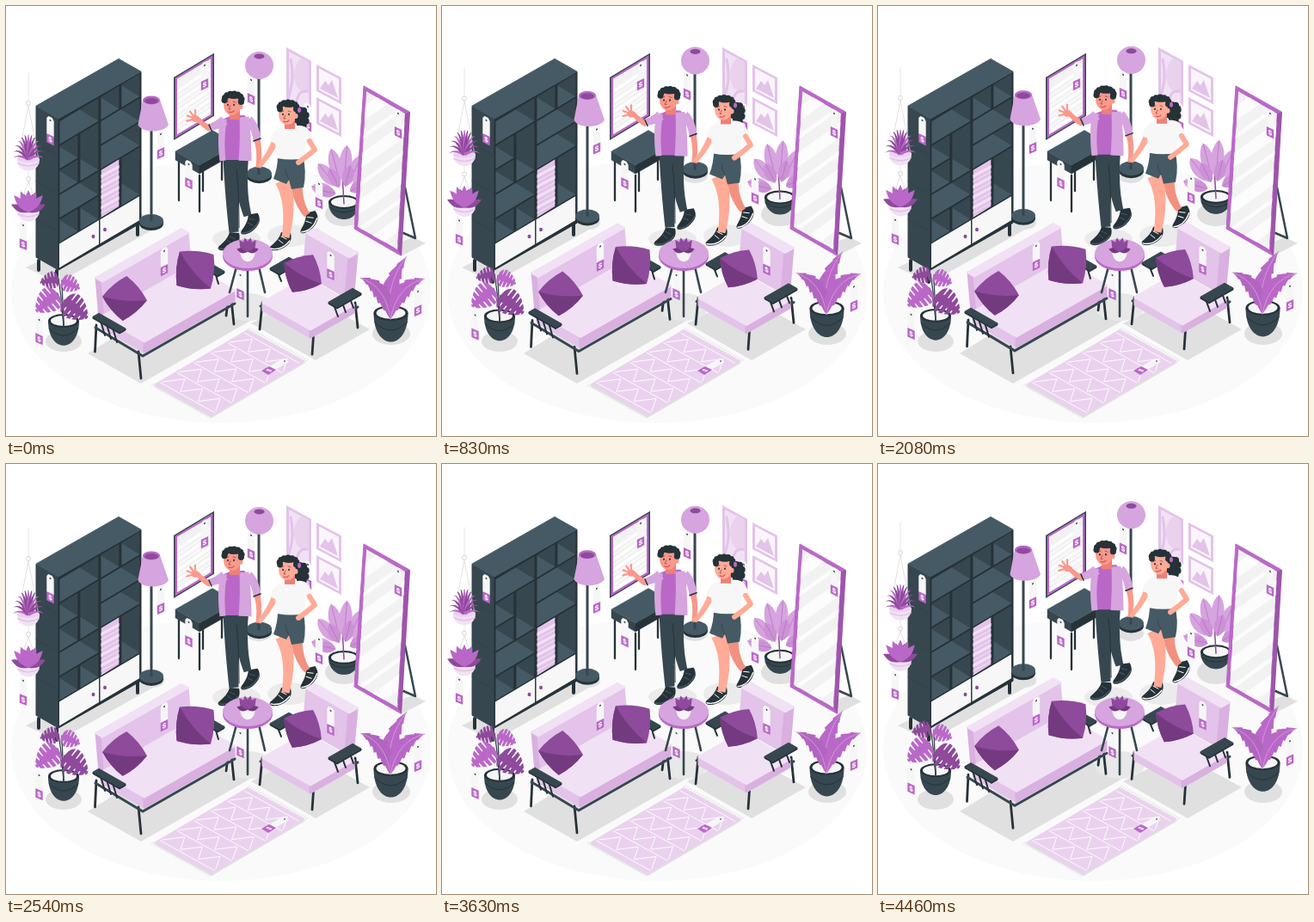
These frames come from a looping animation (500 by 500 pixels, 4.5 s). An HTML page:

```html
<!DOCTYPE html>
<html lang="en">
<head>
<meta charset="utf-8">
<title>Furniture showroom</title>
<style>
html, body { margin: 0; width: 100%; height: 100%; overflow: hidden; background: #fff; }
svg { display: block; width: 100%; height: 100%; }
text { font: 700 7.5px Inter, Arial, sans-serif; text-anchor: middle; fill: #fff; }
</style>
</head>
<body>
<svg id="stage" viewBox="0 0 500 500"></svg>
<script>
const INK = '#263238', DARK = '#37474f', SLATE = '#455a64';
const PURPLE = '#ba68c8', DEEP = '#8e4a9b', PLUM = '#743a80';
const MID = '#d6a4de', ROSE = '#d9b0e0', PINK = '#e3c3e9', PALE = '#ead2ee', LIGHT = '#f1e1f4';
const SHADE = '#e0e0e0', TAN = '#f9988b', PEACH = '#ffab97';
const ISO = .57;

const path = (d, fill, extra = '') => `<path d="${d}" fill="${fill}" ${extra}/>`;
const line = (d, color, w = 1) =>
  path(d, 'none', `stroke="${color}" stroke-width="${w}" stroke-linecap="round" stroke-linejoin="round"`);
const soft = (pts, fill, w = 1) =>
  `<polygon points="${pts}" fill="${fill}" stroke="${fill}" stroke-width="${w}" stroke-linejoin="round"/>`;
const poly = (pts, fill) => `<polygon points="${pts}" fill="${fill}"/>`;
const oval = (x, y, rx, ry, fill) => `<ellipse cx="${x}" cy="${y}" rx="${rx}" ry="${ry}" fill="${fill}"/>`;
const float = s => `<g class="float">${s}</g>`;
const repeat = (n, f) => Array.from({ length: n }, (_, i) => f(i, n > 1 ? i / (n - 1) : 0)).join('');
const polar = (x, y, r, deg, ry = r) =>
  [x + r * Math.cos(deg * Math.PI / 180), y + ry * Math.sin(deg * Math.PI / 180)];

let clips = 0;
function clipped(pts, body) {
  const id = 'c' + clips++;
  return `<clipPath id="${id}"><polygon points="${pts}"/></clipPath><g clip-path="url(#${id})">${body}</g>`;
}

// Solid with its nearest top corner at x, y; a runs back to the left, b to the right
function box(x, y, a, b, h, [top, left, right], lean = 0, round = 1) {
  const l = [x - a, y - a * ISO], r = [x + b, y - b * ISO], back = [x + b - a, y - (a + b) * ISO];
  const down = p => [p[0] + lean, p[1] + h];
  return soft([l, [x, y], down([x, y]), down(l)], left, round) +
    soft([r, [x, y], down([x, y]), down(r)], right, round) + soft([l, [x, y], r, back], top, round);
}

// Parallelogram with upright sides, inset by m
function panel(x, y, w, h, slope, m = 0) {
  const at = u => y + slope * u;
  return [[x + m, at(m) + m], [x + w - m, at(w - m) + m], [x + w - m, at(w - m) + h - m], [x + m, at(m) + h - m]];
}

// Band of varying half-width along a quadratic curve
function ribbon([x0, y0], [cx, cy], [x1, y1], width, fill, n = 20) {
  const left = [], right = [];
  for (let i = 0; i <= n; i++) {
    const t = i / n, s = 1 - t, w = width(t);
    const x = s * s * x0 + 2 * s * t * cx + t * t * x1, y = s * s * y0 + 2 * s * t * cy + t * t * y1;
    const dx = s * (cx - x0) + t * (x1 - cx), dy = s * (cy - y0) + t * (y1 - cy), k = w / Math.hypot(dx, dy);
    left.push([(x - dy * k).toFixed(1), (y + dx * k).toFixed(1)]);
    right.unshift([(x + dy * k).toFixed(1), (y - dx * k).toFixed(1)]);
  }
  return poly([...left, ...right], fill);
}
const limb = (p, c, q, w0, w1, fill) => ribbon(p, c, q, t => w0 + (w1 - w0) * t, fill);
const mid = (p, q) => [(p[0] + q[0]) / 2, (p[1] + q[1]) / 2 - .01];
const leaf = (p, q, w, fill) => ribbon(p, mid(p, q), q, t => w * Math.sin(Math.PI * t), fill);
const fan = (x, y, r, from, to, n, w, fill) =>
  repeat(n, (i, t) => leaf([x, y], polar(x, y, r, from + (to - from) * t), w, fill));

function tag(x, y, slope) {
  return `<g transform="matrix(1 ${slope} 0 1 ${x} ${y})">
    <path d="M-4.2-4V-23l2-3h4.4l2 3V-4z" fill="#f6f6f6"/>
    <circle cy="-22" r="1" fill="${DARK}"/>
    <rect x="-4.2" y="-5" width="8.4" height="10.4" fill="${PURPLE}"/>
    <text y="3">$</text></g>`;
}

const pot = (x, y, rx, h) =>
  path(`M${x - rx} ${y}C${x - rx} ${y + h * 1.28} ${x + rx} ${y + h * 1.28} ${x + rx} ${y}z`, DARK) +
  line(`M${x - rx + 1} ${y + h * .3}Q${x} ${y + h * .85} ${x + rx - 1} ${y + h * .3}`, INK) +
  oval(x, y, rx, rx * .44, INK) + oval(x, y, rx - 3, rx * .44 - 2, '#f5f5f5');

function glass(pts, base, stripe) {
  const [x, y] = pts[0], w = pts[1][0] - x, h = pts[2][1] - y;
  return clipped(pts, poly(pts, base) + repeat(9, i => {
    const c = y + (i + .3) * h / 7, half = w * .5;
    return line(`M${x - 9} ${c + half}L${x + w + 9} ${c - half}`, stripe, h * (i % 2 ? .025 : .075));
  }));
}

function shadows() {
  return oval(250, 332, 244, 153, '#fafafa') +
    poly('23,304 60,322 180,255 155,240', SHADE) +
    oval(170, 252, 14, 8, SHADE) + oval(294, 197, 15, 9, SHADE) +
    oval(268, 271, 28, 12, '#ebebeb') + oval(330, 267, 26, 13, '#ebebeb') +
    oval(393, 242, 22, 14, SHADE) + poly('459,291 488,276 474,269 440,280', SHADE) +
    poly('95,404 157,439 284,366 216,329', SHADE) +
    poly('285,369 360,412 423,376 350,336', SHADE) + oval(281, 350, 29, 16, '#e8e8e8') +
    oval(67, 390, 21, 12, SHADE) + oval(448, 381, 22, 13, SHADE);
}

function wall() {
  const mirror = m => panel(195, 83, 47, 73, -.6, m), art = m => panel(326, 48, 29, 76, .55, m);
  const print = y => poly(panel(361, y, 29, 31, .53), PINK) + poly(panel(361, y, 29, 31, .53, 3), '#faf5fb') +
    path(`M365 ${y + 28}l6-9l4 5l4-6l7 21z`, PINK);
  return poly(mirror(0), DARK) + poly(mirror(1.6), PURPLE) + glass(mirror(4), '#f2f2f2', '#fff') +
    poly(art(0), PINK) + clipped(art(3), poly(art(3), LIGHT) + oval(349, 80, 14, 21, PALE) +
      line('M327 120C342 122 334 97 350 99M331 62C337 90 328 103 328 109', PINK, 3)) +
    print(68) + print(106) + tag(231, 91, -.5) + tag(351, 139, .5);
}

// Cabinet front: u runs along its width, v down from its top edge
function cabinet() {
  const X = u => 61 + 96 * u, Y = (u, v) => 131 - 57 * u + v;
  const quad = (a, b, c, d) => [[X(a), Y(a, c)], [X(b), Y(b, c)], [X(b), Y(b, d)], [X(a), Y(a, d)]];
  const cell = (a, b, row, rows = 1) => {
    const pts = quad(a + .015, b - .015, row * 28.5 + 4, (row + rows) * 28.5 + 2);
    const [p, q, r, s] = pts, back = ([x, y]) => [x - 26, y - 16];
    return clipped(pts, poly(pts, '#2e3c43') + poly([q, r, back(r), back(q)], DARK) + poly([s, r, back(r), back(s)], SLATE));
  };
  const door = quad(.515, .735, 89, 144);
  return line('M38 296v11M59 308v13M153 252v14', INK, 4) +
    box(61, 131, 26, 96, 176, [SLATE, DARK, INK]) +
    repeat(3, i => line(`M35 ${160 + 44 * i}l26 15`, '#304049', .8)) +
    cell(0, .5, 0) + cell(0, .25, 1) + cell(0, .25, 2) + cell(.25, .5, 1, 2) + cell(0, .5, 3) +
    cell(0, .25, 4) + cell(.25, .5, 4) + cell(.5, .75, 0) + cell(.75, 1, 0) +
    cell(.5, 1, 1) + cell(.5, 1, 2) + cell(.75, 1, 3, 2) + glass(door, PINK, LIGHT) +
    poly(quad(.01, .49, 146, 174), '#f7f7f7') + poly(quad(.505, .98, 146, 174), '#f7f7f7') +
    oval(101.5, 268, 2, 2.3, DEEP) + oval(115, 260, 2, 2.3, DEEP) + tag(51.5, 155, .5);
}

function hanging() {
  const bowl = (y, hook) => line(`M26 ${hook + 3}L14 ${y}M26 ${hook + 3}L38 ${y}`, '#dadada', .8) +
    `<circle cx="26" cy="${hook}" r="2.5" fill="none" stroke="#d5d5d5"/>` +
    path(`M13 ${y}C13 ${y + 18} 39 ${y + 18} 39 ${y}z`, LIGHT) +
    line(`M14 ${y + 5}Q26 ${y + 11} 38 ${y + 5}`, PINK, 1.5) + oval(26, y, 13, 4, PALE);
  const spider = repeat(13, (i, t) => {
    const a = 180 + 180 * t;
    return ribbon([26, 178], polar(26, 172, 12, a, 26), polar(26, 177, 18, a, 27), s => 2 * (1 - s), i % 3 ? DEEP : PURPLE);
  });
  return line('M26 78V110M26 190V198', '#e0e0e0', .8) + bowl(178, 113) + spider + bowl(237, 201) +
    fan(26, 240, 22, -155, -25, 6, 4, DEEP) + fan(26, 240, 26, -130, -50, 5, 4, PURPLE) + tag(20, 277, .4);
}

const lampBase = (x, y, r) => oval(x, y + 3, r, r * .57, INK) + oval(x, y, r, r * .57, SLATE);

function shadeLamp() {
  return lampBase(169, 250, 14) + line('M169 143V249', DARK, 3) +
    path('M159 109L153.5 138C157 148 184 148 189 138L179 109z', MID) +
    oval(169, 109.5, 10, 5, PURPLE) + oval(169, 110.5, 8, 3.5, DEEP) + tag(180, 171, -.45);
}

function ballLamp() {
  return lampBase(294.5, 195, 14.5) + line('M294 83V195', DARK, 3) + oval(294.5, 69, 16.5, 16, MID) +
    oval(294.5, 58.5, 6, 3, DEEP) + tag(285, 108, .45);
}

function desk() {
  return line('M201 180V226M225 197V239M251 180V202M229 180V215', INK, 2.3) +
    box(225, 185, 28, 43, 10, [SLATE, DARK, INK], 0, .5) + tag(212.5, 206, .5);
}

function shoe(x, y, turn, lace) {
  return `<g transform="translate(${x} ${y}) rotate(${turn})">` +
    path('M0 0c5-4 10-9 12-16l11 1c2 8-1 12-5 15c-5 4-11 6-17 5c-3-1-3-3-1-5z', INK) +
    line('M0 3q12 3 22-9', lace, 1.4) + line('M9-7l5 4M12-11l6 3', lace, 1) + '</g>';
}

function face(x, y, skin) {
  return limb([x + 3, y + 4], [x + 3, y + 10], [x + 3, y + 17], 6, 6, '#ee8076') +
    oval(x, y, 10, 12, skin) + oval(x + 10, y + 2, 2.5, 3, skin) + oval(x - 5, y, .9, 1.2, INK) + oval(x + 2, y, .9, 1.2, INK) +
    line(`M${x - 7} ${y - 3}l3-1M${x + 1} ${y - 4}l3 1M${x - 2} ${y + 1}l-2 4h2`, '#8b3c43', .7) +
    line(`M${x - 4} ${y + 8}q3 2 6-1`, '#d64e55', 1.1);
}
const curls = (x, y, rx, ry, from, to, n, r) => repeat(n, (i, t) => {
  const [cx, cy] = polar(x, y, rx, from + (to - from) * t, ry);
  return oval(cx, cy, r, r, INK);
});

function man() {
  const legs = shoe(274, 261, -14, SLATE) + shoe(248, 279, 0, SLATE) +
    limb([273, 176], [272, 215], [281, 244], 9, 4.5, DARK) + limb([262, 176], [262, 220], [265, 263], 9.5, 5.5, DARK) +
    line('M268 190Q271 215 271 258', INK);
  const hand = limb([238, 143], [228, 138], [222, 130], 3.5, 2.5, TAN) + oval(220, 131, 4.5, 4, TAN) +
    repeat(4, (i, t) => line(`M220 131L${polar(220, 131, 10, -195 + 105 * t)}`, TAN, 2.2));
  const body = path('M251 132L263 127H277L284 134L279 179H254z', PURPLE) +
    limb([253, 131], [249, 155], [252, 180], 4, 3.5, MID) + limb([277, 129], [279, 155], [278, 180], 5.5, 7.5, MID);
  const arms = limb([254, 133], [248, 138], [237, 141], 6, 4, MID) + line('M236 138L239 145', INK, 1.5) +
    limb([291, 154], [296, 166], [293, 188], 3.6, 2.6, TAN) +
    limb([282, 132], [290, 140], [292, 156], 5, 4.5, MID) + line('M288 157L296 154', INK, 1.5);
  return hand + legs + body + arms + face(263, 115, TAN) +
    curls(264, 109, 10, 7, -185, 20, 9, 3.6) + oval(265, 104, 9, 4, INK);
}

function woman() {
  const legs = shoe(343, 260, -20, '#fff') + limb([338, 205], [338, 226], [350, 243], 7, 3.8, '#f2917f') +
    shoe(308, 279, 0, '#fff') + limb([321, 203], [333, 228], [325, 269], 8.5, 4.5, PEACH);
  const arm = limb([314, 153], [310, 168], [294, 187], 4, 2.6, PEACH);
  const shorts = path('M316 174H345Q350 192 346 211L332 213L329 202L326 207L311 201Q316 188 316 174z', SLATE) +
    line('M329 202Q325 196 325 190', DARK);
  const hair = curls(344, 130, 5, 9, -110, 250, 9, 4) + oval(344, 130, 5, 9, INK);
  const top = path('M318 142Q327 137 340 139C351 138 354 147 357 155L348 160L347 177Q332 180 315 177L313 160L307 157Q309 147 318 142z', '#f7f7f7');
  return legs + arm + hair + shorts + top + line('M353 157L359 167Q350 175 340 182', PEACH, 6) +
    face(327, 126, PEACH) + curls(328, 118, 10, 6, -200, 20, 9, 3.4) + oval(329, 114, 9, 4, INK) + oval(341, 121, 2, 3, PURPLE);
}

function fig() {
  const ring = (n, r, ry, w, fill) => repeat(n, (i, t) => {
    const a = -170 + 145 * t, p = polar(392, 220, r * .3, a, ry * .3), q = polar(392, 220, r, a, ry);
    return ribbon(p, mid(p, q), q, s => w * Math.sin(Math.PI * s) ** .6, fill) + line(`M${p}L${q}`, PURPLE, .7);
  });
  return pot(393, 228, 18, 21) + line('M393 230L391 195', DEEP, 1.5) +
    ring(6, 37, 58, 7.5, MID) + ring(4, 30, 36, 6.5, '#cb92d5') + tag(364, 229, .45);
}

function standMirror() {
  return line('M464 211L476 270L462 264', DARK, 2.5) +
    soft('416,93 469,123 459,290 405,259', PURPLE) + poly('464,125 470,123 460,291 456,284', '#9d55aa') +
    glass([[419, 99], [464, 125], [455, 283], [409, 257]], '#f2f2f2', '#fcfcfc') + tag(456, 147, .5);
}

function pillow(x, y, r, turn) {
  const corner = i => polar(x, y, r, turn + 90 * i), side = i => polar(x, y, r * .86, turn + 90 * i + 45);
  const edge = i => `Q${side(i)} ${corner(i + 1)}`;
  return path(`M${corner(0)}${edge(0)}${edge(1)}${edge(2)}${edge(3)}z`, DEEP) +
    path(`M${corner(0)}${edge(0)}${edge(1)}Q${polar(x, y, r * .2, turn + 90)} ${corner(0)}z`, PLUM);
}

const arm = (x, y, a, b) => box(x, y, a, b, 2, [DARK, INK, INK]);
const CUSHION = [LIGHT, PINK, ROSE];

function sofa() {
  return line('M105 371L103.5 402M154 402L157 433M262 342L265 370M258 344L256 360', INK, 2.8) +
    box(112, 320, 7, 99, 46, [LIGHT, ROSE, PINK], 4, 3) +
    line('M104 374L159 407L266 346', DARK, 3) + box(161, 390, 50, 104, 12, CUSHION, 0, 3) +
    line('M244 313l3 10', INK, 2) + arm(246, 313, 18, 8) + pillow(138, 340, 26, 5) + pillow(220, 307, 28, 50) +
    repeat(3, i => line(`M${110 + 7 * i} ${366 + 4 * i}l5 17`, INK, 2)) + arm(132, 379, 31, 7) + tag(184, 307, -.5);
}

function armchair() {
  return line('M298 345L295 376M358 376L356 405M406 345L409 374', INK, 2.8) +
    box(399, 292, 49, 9, 46, [LIGHT, PINK, ROSE], -4, 3) +
    line('M296 349L355 382L409 350', DARK, 3) + box(354, 376, 55, 50, 9, CUSHION, 0, 3) +
    line('M316 310l4 10', INK, 2) + arm(318, 311, 11, 22) + pillow(345, 311, 25, 29) +
    repeat(3, i => line(`M${382 + 9 * i} ${350 - 5 * i}l4 11`, INK, 2)) + arm(385, 350, 10, 28) + tag(377.5, 312, .45);
}

function table() {
  return line('M268 303L260 333M294 303L301 333M281 306V361', DARK, 2.6) +
    oval(281, 291, 29, 17, PURPLE) + oval(281, 288, 29, 17, MID) +
    path('M272 283C272 302 290 302 290 283z', '#f5f5f5') + oval(281, 283, 9, 3, PALE) +
    fan(281, 286, 13, -165, -15, 6, 3, PLUM) + fan(281, 286, 17, -125, -55, 4, 3, DEEP) + tag(272.5, 335, .45);
}

function rug() {
  const at = (a, b) => `${(172 + 109 * a + 67 * b).toFixed(1)} ${(440 - 64 * a + 37 * b).toFixed(1)}`;
  const area = `M${at(0, 0)}L${at(1, 0)}L${at(1, 1)}L${at(0, 1)}z`;
  const bands = repeat(6, i => `M${at(.05 + .18 * i, .03)}L${at(.05 + .18 * i, .97)}`);
  const zigzag = repeat(5, i => repeat(7, (k, t) => (k ? 'L' : 'M') + at(.07 + .18 * i + (k % 2) * .14, .04 + .92 * t)));
  const fringe = repeat(27, (k, t) => `M${at(0, t)}l-3 1.8M${at(1, t)}l3-1.8`);
  return path(area, SHADE, 'transform="translate(0 2)"') + path(area, PALE) + line(bands + zigzag, '#fff', .9) +
    line(fringe, '#dedede', .9) + poly('306,419 322,410 329,414 313,423', '#f6f6f6') + oval(324, 413, 1, .7, DARK) +
    poly('297,424 306,419 314,423 305,429', PURPLE) + '<text transform="matrix(.8 -.45 .8 .45 308 425)">$</text>';
}

function monstera() {
  const slit = t => t > .12 && t * 5.5 % 1 < .22 ? .35 : 1;
  const blade = (x, y, r, deg, fill) => {
    const tip = polar(x, y, r, deg);
    return line(`M67 372Q66 350 ${x} ${y}`, DARK, 1.3) +
      ribbon([x, y], mid([x, y], tip), tip, t => r * .45 * Math.sin(Math.PI * t ** .6) ** .7 * slit(t), fill, 60);
  };
  return pot(67, 366, 18, 30) + blade(61, 317, 22, 168, DEEP) + blade(65, 319, 23, 25, PURPLE) +
    blade(60, 334, 33, 140, PURPLE) + blade(68, 342, 34, 38, DEEP) + tag(38.5, 387, .45);
}

function palm() {
  const frond = (c, tip, w, fill) =>
    ribbon([447, 364], c, tip, t => w * Math.sin(Math.PI * t ** .9) * (1 - .3 * (t * 6 % 1)), fill, 60) +
    line(`M447 364Q${c} ${tip}`, MID, .8);
  return pot(447.5, 357, 20, 35) + frond([440, 325], [466, 291], 10, PURPLE) +
    frond([442, 326], [412, 316], 10, '#b265c0') + frond([455, 324], [487, 317], 10, PURPLE) + tag(479, 354, -.45);
}

const stage = document.getElementById('stage');
stage.innerHTML = shadows() + rug() + wall() + cabinet() + float(hanging() + shadeLamp() + ballLamp()) +
  desk() + float(fig() + man() + woman()) + standMirror() +
  float(sofa() + armchair()) + table() + float(monstera() + palm());
const floats = [...stage.querySelectorAll('.float')];

const LOOP = 4500, CYCLE = 3000, RISE = 10;
function draw(ms) {
  const phase = (ms % LOOP) % CYCLE / CYCLE;
  const up = RISE * (1 - Math.abs(1 - 2 * phase));
  for (const g of floats) g.setAttribute('transform', `translate(0 ${-up.toFixed(3)})`);
}

const start = performance.now();
function tick() {
  draw(performance.now() - start);
  requestAnimationFrame(tick);
}
tick();
</script>
</body>
</html>
```
